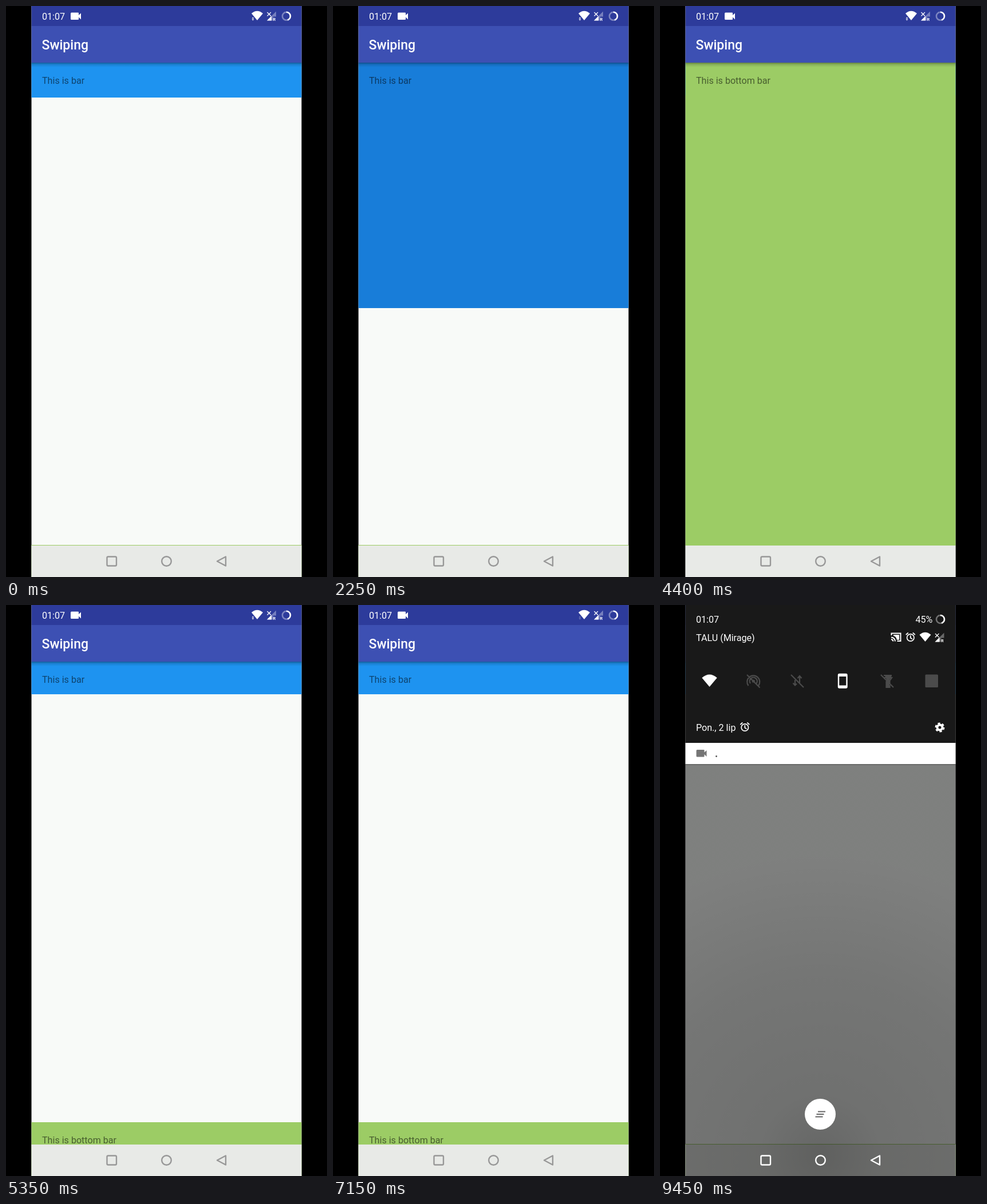
Write an HTML page that moves like this. It is 561 px wide and 998 px high and loops after 9500 ms.

```html
<!DOCTYPE html>
<html lang="en">
<head>
<meta charset="utf-8">
<title>Swiping</title>
<style>
html, body { margin: 0; width: 100%; height: 100%; overflow: hidden; background: #000; }
svg { display: block; width: 100%; height: 100%; }
text { font: 16.1px Roboto, sans-serif; fill: #fff; }
.title { font-size: 23px; font-weight: 500; }
.label { fill: #000; fill-opacity: .54; }
.line { fill: none; stroke: #fff; stroke-width: 2; }
.off { fill: none; stroke: #4b4b4b; stroke-width: 2.2; }
</style>
</head>
<body>
<svg viewBox="0 0 561 998">
  <defs>
    <clipPath id="screen"><path d="M44.5 0H516.5V998H44.5Z"/></clipPath>
    <linearGradient id="shadow" x2="0" y2="1">
      <stop stop-opacity=".36"/><stop offset=".4" stop-opacity=".13"/><stop offset="1" stop-opacity="0"/>
    </linearGradient>
    <radialGradient id="dim" gradientUnits="userSpaceOnUse" cx="280" cy="960" r="520">
      <stop stop-opacity=".59"/><stop offset=".2" stop-opacity=".55"/>
      <stop offset=".6" stop-opacity=".53"/><stop offset="1" stop-opacity=".49"/>
    </radialGradient>
    <path id="camera" d="M1.5 0H13Q14 0 14 1V4.5L18 1V12L14 8V11Q14 12.500 13 12.500H1.500Q0 12.500 0 11V1.500Q0 0 1.500 0Z"/>
    <path id="wifi" d="M-10 -4Q0 -12.500 10 -4L0 8Z"/>
    <g id="signal">
      <path d="M0 16L16 0V9H11V16Z" fill="#fff" opacity=".35"/>
      <path d="M0 16L8 8V16Z" fill="#fff"/>
      <path d="M.5 1.500L7 8M7 1.500L.5 8" class="line" style="stroke-width:1.300"/>
      <text x="10.800" y="16" style="font-size:7px;font-weight:700">R</text>
    </g>
    <g id="battery" fill="none" stroke-width="2.600">
      <circle r="7" stroke="#fff" opacity=".38"/>
      <path d="M0 -7A7 7 0 0 1 2.200 6.650" stroke="#fff"/>
    </g>
    <g id="alarm" class="line" style="stroke-width:1.700">
      <circle r="6.200" cy="1"/><path d="M0 -3V1.500L3 3.500M-8 -4L-4 -7.500M8 -4L4 -7.500"/>
    </g>
  </defs>
  <g clip-path="url(#screen)">
    <path d="M44 0H517V998H44Z" fill="#f8faf8"/>
    <rect id="blue" x="44" y="99" width="473"/>
    <text class="label" x="63" y="135.500">This is bar</text>
    <g id="green">
      <path d="M44 0H517V844H44Z" fill="#9ccc65"/>
      <text class="label" x="63" y="36.500">This is bottom bar</text>
    </g>
    <path d="M44 99H517V107H44Z" fill="url(#shadow)"/>
    <path d="M44 0H517V35H44Z" fill="#2d3b9b"/>
    <path d="M44 35H517V99H44Z" fill="#3d50b3"/>
    <text x="63" y="23.700">01:07</text>
    <use href="#camera" x="113" y="11.500" fill="#fff"/>
    <use href="#wifi" x="439" y="17" fill="#fff"/>
    <path id="arrows" d="M429.500 22L431.500 19.500L433.500 22ZM429.500 23L431.500 25.500L433.500 23Z" fill="#fff"/>
    <use href="#signal" x="456" y="9.500"/>
    <use href="#battery" x="490" y="17.800"/>
    <text class="title" x="62.500" y="76">Swiping</text>
    <path d="M44 943H517V998H44Z" fill="#e8eae7"/>

    <g id="scrim">
      <path d="M44 0H517V998H44Z" fill="url(#dim)"/>
      <circle cx="280" cy="890" r="27" fill="#fff"/>
      <path d="M276 885.500H289M273.500 890H286.500M271.500 894.500H284.500" stroke="#666" stroke-width="2"/>
    </g>
    <g id="nav" fill="none" stroke-width="2.400">
      <rect x="176.500" y="962.500" width="16.500" height="16" rx="2"/>
      <circle cx="280.500" cy="970.500" r="8.300"/>
      <path d="M369 970.500L384 962.500V978.500Z" stroke-linejoin="round"/>
    </g>
    <g id="shade">
      <path d="M44 0H517V241H44Z" fill="#191919"/>
      <path d="M44 241H517V278H44Z" fill="#fff"/>
      <path d="M44 278H517V279.500H44Z" fill="#000" opacity=".25"/>
      <text x="63" y="30.700">01:07</text>
      <text x="446.500" y="30.700">45%</text>
      <use href="#battery" x="490" y="25"/>
      <text x="63" y="62.500">TALU (Mirage)</text>
      <path class="line" d="M404.500 53V49.500H420.500V63H414.500M404 56.500A7 7 0 0 1 411 63.500M404 60A4 4 0 0 1 407.500 63.500"/>
      <path d="M408 52H418V61H414Q413 55 408 54Z" fill="#fff"/>
      <use href="#alarm" x="437.800" y="56"/>
      <use href="#wifi" x="463.500" y="56" fill="#fff"/>
      <use href="#signal" x="480.500" y="48.500"/>
      <use href="#wifi" transform="translate(86.500 132.500) scale(1.320)" fill="#fff"/>
      <g class="off">
        <path d="M154.500 141A11 11 0 1 1 172 141M158 137A6.500 6.500 0 1 1 168.500 137M152 122L174.500 144.500"/>
        <circle cx="163.300" cy="133" r="1.500"/>
        <path d="M229 122L251 144M236 131V140M232.500 136.500L236 140.500L239 137.500M244 136V124M240.500 128L244 124L247.500 128"/>
        <path d="M386 122L408 144M391 123H405M392 127H405L401.500 132V137M395.500 133V144H401.500V140"/>
      </g>
      <path d="M393 124H405L401 131V143H396V131Z" fill="#4b4b4b"/>
      <rect x="463.500" y="121.500" width="22.500" height="22.500" rx="1.500" fill="#4b4b4b"/>
      <rect x="312" y="121" width="14.500" height="23.500" rx="1.500" class="line" style="stroke-width:2.400"/>
      <path d="M312 121H326.500V125H312ZM312 140.500H326.500V144.500H312Z" fill="#fff"/>
      <text x="63" y="219.700">Pon., 2 lip</text>
      <use href="#alarm" x="148.300" y="213"/>
      <circle cx="489" cy="214" r="4.500" class="line" style="stroke-width:4"/>
      <circle cx="489" cy="214" r="7.300" class="line" style="stroke-width:2.400;stroke-dasharray:4.200 3.445"/>
      <use href="#camera" x="63.500" y="253" fill="#757575"/>
      <circle cx="98.500" cy="264.500" r="1.400" fill="#555"/>
    </g>
  </g>
</svg>
<script>
const LOOP = 9500, TICK = 50;
const TOP = 99, CLOSED = 156, HALF = 352, BOTTOM = 942;
const SWIPE = 1.67, SNAP = 2.62;
const $ = id => document.getElementById(id);

// Each move: start time, ticks, end value, sharpness of the ease.
const blueMoves = [
  [550, 4, HALF, SNAP], [1300, 8, BOTTOM, SWIPE], [2050, 8, HALF, SWIPE],
  [2900, 4, CLOSED, SNAP], [7350, 4, HALF, SNAP], [8300, 4, CLOSED, SNAP]
];
const greenMoves = [
  [3600, 7, HALF, SWIPE], [4300, 3, TOP, SWIPE], [4800, 3, HALF, SWIPE],
  [5150, 6, BOTTOM, SWIPE], [6000, 8, HALF, SWIPE], [6950, 6, BOTTOM, SWIPE]
];
const shadeMoves = [[9200, 6, 1, SWIPE]];

const mix = (a, b, p) => a + (b - a) * p;
const ease = (s, k) => s ** k / (s ** k + (1 - s) ** k);

function valueAt(t, value, moves) {
  for (const [start, ticks, end, sharp] of moves) {
    if (t < start) break;
    const s = Math.min(1, ((t - start) / TICK + 1) / ticks);
    value = mix(value, end, ease(s, sharp));
  }
  return value;
}

function draw(t) {
  const blue = Math.round(valueAt(t, 160, blueMoves));
  const depth = (blue - CLOSED) / (BOTTOM - CLOSED);
  const rgb = [[30, 18], [147, 100], [240, 192]].map(([a, b]) => Math.round(mix(a, b, depth)));
  $("blue").setAttribute("height", blue - TOP);
  $("blue").setAttribute("fill", `rgb(${rgb})`);

  const green = Math.round(valueAt(t, BOTTOM, greenMoves));
  $("green").setAttribute("transform", `translate(0 ${green})`);
  $("arrows").setAttribute("opacity", t < 6000 ? .9 : .3);

  const open = valueAt(t, 0, shadeMoves);
  $("shade").setAttribute("transform", `translate(0 ${mix(-280, 0, open)})`);
  $("scrim").setAttribute("opacity", open);
  const tone = Math.round(mix(152, 255, open));
  $("nav").setAttribute("stroke", `rgb(${tone},${tone},${tone})`);
}

const begin = performance.now();
function frame() {
  const t = (performance.now() - begin) % LOOP;
  draw(Math.floor(t / TICK) * TICK);
  requestAnimationFrame(frame);
}
frame();
</script>
</body>
</html>
```
